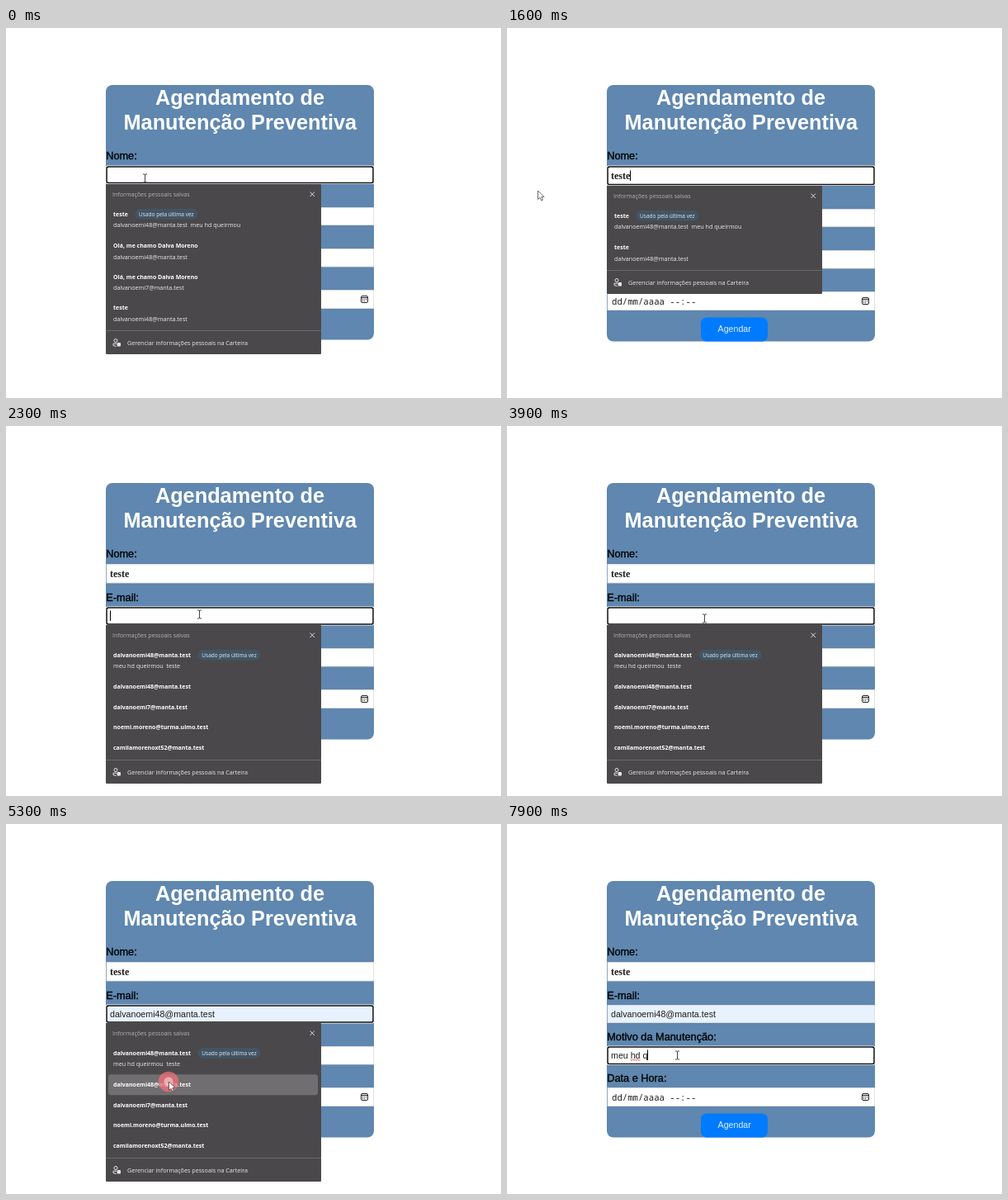
An HTML page with a canvas for the animation above (8 s loop, 600 px wide and 448 px high).

```html
<!DOCTYPE html>
<html lang="pt-BR">
<head>
<meta charset="utf-8">
<title>Agendamento</title>
<style>
html, body { margin: 0; width: 100%; height: 100%; overflow: hidden; background: #fff; }
canvas { display: block; width: 600px; height: 448px; }
</style>
</head>
<body>
<canvas id="stage" width="600" height="448"></canvas>
<script>
const ctx = document.getElementById('stage').getContext('2d');
const LOOP = 8000, STEP = 100;
const SANS = '"Liberation Sans", Arial, sans-serif';
const SERIF = '"Liberation Serif", "Times New Roman", serif';
const MONO = '"Noto Sans Mono", "DejaVu Sans Mono", monospace';
const UI = '"Open Sans", "Noto Sans", sans-serif';
const INPUT = '10.67px ' + SANS, TITLE = 'bold 25.3px ' + SANS;
const BLUE = '#5f87af', FILLED = '#e8f2fe', INK = '#1d1d1d';

const MAIL = 'dalvanoemi48@manta.test';
const HELLO = 'Olá, me chamo Dalva Moreno';
const FIRST = { name: 'teste', sub: MAIL + '  meu hd queirmou', y: 36, used: true };

const POPUPS = {
  all: { top: 189, bottom: 395, items: [
    FIRST,
    { name: HELLO, sub: MAIL, y: 74.5 },
    { name: HELLO, sub: 'dalvanoemi7@manta.test', y: 112 },
    { name: 'teste', sub: MAIL, y: 149.5 }
  ] },
  name: { top: 191, bottom: 322, items: [FIRST, { name: 'teste', sub: MAIL, y: 74.5 }] },
  mail: { top: 241, bottom: 433, items: [
    { name: MAIL, sub: 'meu hd queirmou  teste', y: 36, used: true },
    { name: MAIL, y: 74.5 },
    { name: 'dalvanoemi7@manta.test', y: 99 },
    { name: 'noemi.moreno@turma.ulmo.test', y: 123.5 },
    { name: 'camilamorenoxt52@manta.test', y: 148 }
  ] }
};

// time, x, y
const PATH = [
  [0, 168, 182], [1200, 168, 182], [1600, 37, 197], [1800, 52, 203], [2100, 234, 228],
  [2300, 234, 228], [2600, 239, 233], [3900, 239, 233], [4000, 410, 232], [4200, 122, 241],
  [4300, 122, 241], [4400, 150, 268], [5000, 197, 302], [5200, 197, 312], [5300, 197, 312],
  [5800, 206, 280], [LOOP, 206, 280]
];
const NAME_KEYS = [[200, 't'], [300, 'te'], [400, 'tes'], [500, 'teste']];
const REASON_KEYS = [[6600, 'm'], [6700, 'me'], [6900, 'meu'], [7100, 'meu '], [7400, 'meu h'],
  [7600, 'meu hd'], [7700, 'meu hd '], [7900, 'meu hd q']];

const within = (t, a, b) => t >= a && t < b;
const typed = (keys, t) => keys.reduce((s, [at, text]) => t >= at ? text : s, '');

function mouseAt(t) {
  const i = Math.max(1, PATH.findIndex(p => p[0] >= t));
  const [a, x, y] = PATH[i - 1], [b, u, v] = PATH[i];
  const k = (t - a) / (b - a);
  return { x: x + (u - x) * k, y: y + (v - y) * k };
}

function box(x, y, w, h, r, color) {
  ctx.fillStyle = color;
  ctx.beginPath();
  ctx.roundRect(x, y, w, h, r);
  ctx.fill();
}

function label(s, x, y, font, color, align = 'left') {
  ctx.font = font;
  ctx.fillStyle = color;
  ctx.textAlign = align;
  ctx.fillText(s, x, y);
  return ctx.measureText(s).width;
}

// label with slightly heavier stems
function caption(s, y) {
  label(s, 121.2, y, '12.75px ' + SANS, '#000');
  ctx.strokeStyle = '#000';
  ctx.lineWidth = .35;
  ctx.strokeText(s, 121.2, y);
}

function line(color, width, ...pts) {
  ctx.strokeStyle = color;
  ctx.lineWidth = width;
  ctx.beginPath();
  pts.forEach(([x, y], i) => i ? ctx.lineTo(x, y) : ctx.moveTo(x, y));
  ctx.stroke();
}

function disc(x, y, r, color) {
  ctx.fillStyle = color;
  ctx.beginPath();
  ctx.arc(x, y, r, 0, 7);
  ctx.fill();
}

function field(y, h, focused, fill = '#fff') {
  if (focused) {
    box(120.4, y - .6, 326.2, h + 1.2, 3, '#fff');
    box(121.3, y + .3, 324.4, h - .6, 2.5, '#101010');
    box(122.8, y + 1.8, 321.4, h - 3.6, 1.5, fill);
  } else {
    box(121.5, y, 324.5, h, 0, '#cfcfd2');
    box(122.2, y + .8, 323.2, h - 1.6, 0, fill);
  }
}

function value(s, y, font, caret) {
  const w = label(s, 126, y, font, INK);
  if (caret) box(Math.round(126 + w), y - 10, 1, 12.5, 0, '#000');
}

function calendar(y) {
  ctx.strokeStyle = '#222';
  ctx.lineWidth = 1;
  ctx.beginPath();
  ctx.roundRect(430.5, y - 4, 8, 8, 1.5);
  ctx.stroke();
  line('#222', 1, [430.5, y - 2], [438.5, y - 2]);
  for (let i = 0; i < 5; i++) box(432 + i % 3 * 2, y - .5 + (i < 3 ? 0 : 2), 1, 1, 0, '#222');
}

function form(s) {
  const d = s.shift;
  box(121, 69, 325, 310.5 + d, 8, BLUE);
  label('Agendamento de', 283.5, 93, TITLE, '#fff', 'center');
  label('Manutenção Preventiva', 283.8, 123, TITLE, '#fff', 'center');
  caption('Nome:', 159);
  caption('E-mail:', 211.5 + d);
  caption('Motivo da Manutenção:', 261.5 + d);
  caption('Data e Hora:', 311.5 + d);

  field(167, 23.5 + d, s.focus === 'name');
  field(219 + d, 22, s.focus === 'mail', s.mail ? FILLED : '#fff');
  field(269 + d, 22.5, s.focus === 'reason', s.reasonHint ? FILLED : '#fff');
  field(319 + d, 23, false);

  value(s.name, 182.5, 'bold 12px ' + SERIF, s.focus === 'name' && s.caret);
  value(s.mail, 233.5, INPUT, s.focus === 'mail' && s.caret);
  value(s.reason, 283.5, INPUT, s.focus === 'reason' && s.caret);
  if (s.typo) {
    const wave = [];
    for (let x = 149.5; x <= 161.5; x += 1.5) wave.push([x, 285.6 + (wave.length % 2 ? .8 : -.6)]);
    line('#e0303c', .9, ...wave);
  }
  label('dd/mm/aaaa --:--', 127, 334.7 + d, '10.67px ' + MONO, INK);
  calendar(330.5 + d);
  box(235, 350.5 + d, 81, 29, 7, '#007bff');
  label('Agendar', 275.7, 368.2 + d, INPUT, '#e2efff', 'center');
}

function walletIcon(y) {
  ctx.strokeStyle = '#e6e6e6';
  ctx.lineWidth = 1;
  ctx.beginPath();
  ctx.arc(133, y - 2.5, 2, 0, 7);
  ctx.stroke();
  line('#e6e6e6', 1, [134, y + 1.2], [130, y + 1.2], [130, y + 3.5], [133.5, y + 4.5]);
  box(134.5, y, 4.5, 4.5, 1, '#e6e6e6');
}

function popup({ top, bottom, items }, hover) {
  box(121, top, 261, bottom - top, 1, '#4a484a');
  label('Informações pessoais salvas', 129, top + 14.6, '7.1px ' + UI, '#b4b2b4');
  line('#dcdcdc', 1, [368.5, top + 9.5], [374, top + 15]);
  line('#dcdcdc', 1, [374, top + 9.5], [368.5, top + 15]);

  items.forEach((it, i) => {
    const y = top + it.y, lit = i === hover;
    if (lit) box(124, y - (it.sub ? 12.5 : 12.3), 254, it.sub ? 38 : 25, 3, '#706e70');
    const w = label(it.name, 130, y + 2.6, 'bold 7px ' + UI, '#fff');
    if (it.sub) label(it.sub, 130, y + 16, '7.2px ' + UI, '#ececec');
    if (it.used) {
      const x = 130 + w + 8.5;
      box(x, y - 6, 76, 12.5, 6.2, lit ? '#bcbcbc' : '#435565');
      label('Usado pela última vez', x + 38, y + 2.6, '6.5px ' + UI, lit ? '#333' : '#dcecf8', 'center');
    }
  });

  line('#6b696b', 1, [121, bottom - 28.5], [382, bottom - 28.5]);
  walletIcon(bottom - 14);
  label('Gerenciar informações pessoais na Carteira', 147, bottom - 11.5, '7.2px ' + UI, '#ececec');
}

function beam({ x, y }) {
  const px = Math.round(x) + .5, py = Math.round(y);
  line('#444', 1, [px, py - 5], [px, py + 5]);
  for (const e of [-5, 5]) {
    line('#444', 1, [px - 2.5, py + e], [px - .5, py + e]);
    line('#444', 1, [px + .5, py + e], [px + 2.5, py + e]);
  }
}

function arrow({ x, y }) {
  ctx.beginPath();
  [[0, 0], [0, 10.5], [2.5, 8.3], [4.2, 12], [5.9, 11.2], [4.3, 7.6], [7.4, 7.4]]
    .forEach(([u, v]) => ctx.lineTo(x + .5 + u, y + v));
  ctx.closePath();
  ctx.fillStyle = '#fff';
  ctx.fill();
  ctx.strokeStyle = '#444';
  ctx.lineWidth = .8;
  ctx.stroke();
}

function press({ x, y }) {
  disc(x, y, 12.3, 'rgba(240, 112, 122, .75)');
  disc(x, y, 5.5, 'rgba(255, 225, 225, .55)');
}

function stateAt(t) {
  const focus = t < 1800 ? 'name' : within(t, 2200, 5800) ? 'mail' : t >= 5800 ? 'reason' : '';
  const hidden = t < 200 || within(t, 1000, 1500) || within(t, 2900, 3400) ||
    within(t, 3900, 5400) || within(t, 6300, 6600);
  return {
    focus,
    caret: !hidden,
    shift: t < 200 ? -2 : 0,
    name: typed(NAME_KEYS, t),
    mail: t >= 4400 ? MAIL : '',
    reason: typed(REASON_KEYS, t),
    reasonHint: within(t, 4400, 5100),
    typo: t >= 7800,
    list: t < 200 ? POPUPS.all : t < 1800 ? POPUPS.name : within(t, 2300, 5400) ? POPUPS.mail : null,
    hover: within(t, 4400, 5100) ? 0 : within(t, 5100, 5400) ? 1 : -1,
    pressed: within(t, 2200, 2300) || within(t, 5300, 5400) || within(t, 5800, 6000)
  };
}

function overField({ x, y }, list) {
  if (x < 121 || x > 446) return false;
  if (list && x < 382 && y >= list.top && y < list.bottom) return false;
  return [167, 219, 269].some(top => y >= top && y <= top + 23);
}

function draw(t) {
  const s = stateAt(t), m = mouseAt(t);
  ctx.fillStyle = '#fff';
  ctx.fillRect(0, 0, 600, 448);
  form(s);
  if (s.list) popup(s.list, s.hover);
  if (s.pressed) press(m);
  (overField(m, s.list) ? beam : arrow)(m);
}

const start = performance.now();
function tick() {
  const t = (performance.now() - start) % LOOP;
  draw(Math.floor(t / STEP) * STEP);
  requestAnimationFrame(tick);
}
tick();
</script>
</body>
</html>
```
